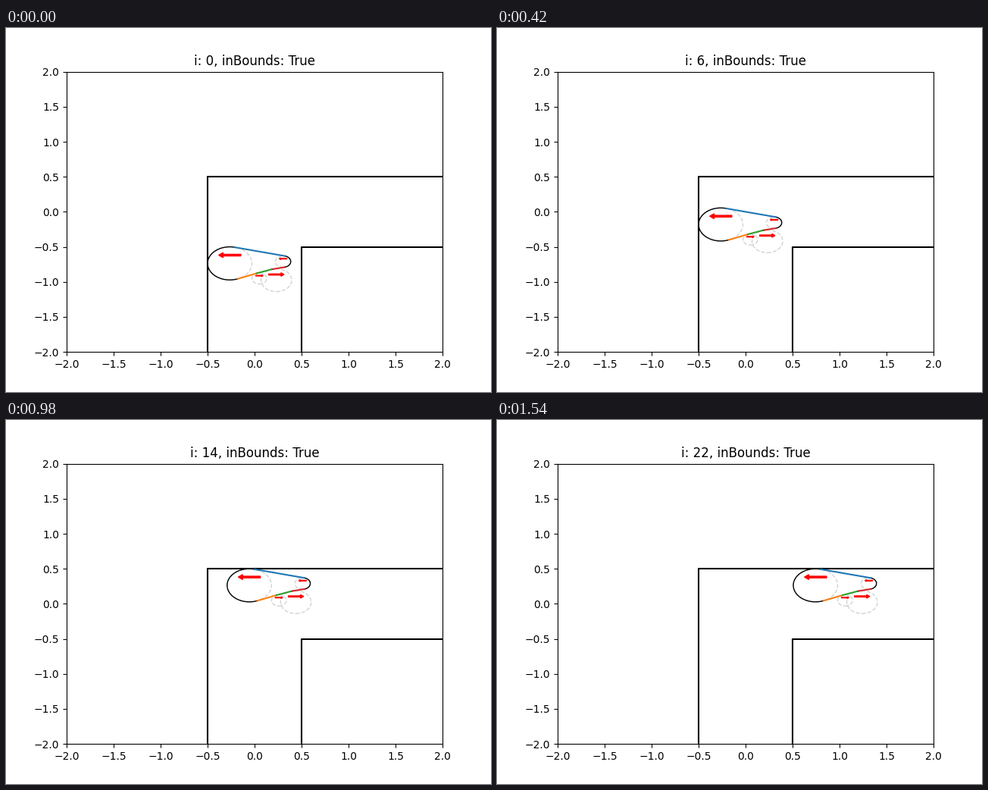
Write a matplotlib script that moves like this. It is 640 by 480 pixels and loops after 1.61 s.

```python
import numpy as np
import matplotlib.pyplot as plt
from matplotlib.animation import FuncAnimation
from matplotlib.patches import Circle
from matplotlib.transforms import Affine2D

FRAMES, INTERVAL = 23, 70

# (x, y, radius, turn): turn +1 bulges outward, -1 inward
BIG = (-0.264, -0.736, 0.236, 1)
TIP = (0.303, -0.710, 0.082, 1)
NOTCH = (0.051, -0.951, 0.079, -1)
HOLLOW = (0.232, -0.976, 0.163, -1)

fig, ax = plt.subplots(figsize=(6.4, 4.8), dpi=100)
shift = Affine2D()
moving = shift + ax.transData


def point(circle, angle):
    x, y, r, _ = circle
    return x + r * np.cos(angle), y + r * np.sin(angle)


def tangent(a, b, side):
    """Angles of the touching points of the line tangent to circles a and b."""
    dx, dy = b[0] - a[0], b[1] - a[1]
    cross = a[3] != b[3]
    reach = a[2] + b[2] if cross else a[2] - b[2]
    angle = np.arctan2(dy, dx) + side * np.arccos(reach / np.hypot(dx, dy))
    return angle, angle + np.pi * cross


def draw_tangent(a, b, angles, color):
    (x0, y0), (x1, y1) = point(a, angles[0]), point(b, angles[1])
    ax.plot([x0, x1], [y0, y1], color=color, transform=moving)


def draw_arc(circle, start, end):
    sweep = (end - start) % (2 * np.pi)
    xs, ys = point(circle, start + np.linspace(0, sweep, 80))
    ax.plot(xs, ys, color="black", lw=1, zorder=1.5, transform=moving)


def draw_guide(circle):
    x, y, r, turn = circle
    ax.add_patch(Circle((x, y), r, fill=False, ls="--", ec="lightgray",
                        transform=moving))
    ax.arrow(x + turn * r / 2, y + r / 2, -turn * r, 0, width=0.1 * r,
             head_width=0.3 * r, head_length=0.2 * r,
             length_includes_head=True, color="red", transform=moving)


# corridor walls
ax.plot([-0.5, -0.5, 2], [-2, 0.5, 0.5], color="black")
ax.plot([0.5, 0.5, 2], [-2, -0.5, -0.5], color="black")

for circle in (BIG, TIP, HOLLOW, NOTCH):
    draw_guide(circle)

top = tangent(BIG, TIP, 1)
low = tangent(BIG, NOTCH, -1)
mid = tangent(NOTCH, HOLLOW, 1)
end = tangent(TIP, HOLLOW, 1)
draw_tangent(BIG, TIP, top, "C0")
draw_tangent(BIG, NOTCH, low, "C1")
draw_tangent(NOTCH, HOLLOW, mid, "C2")
draw_tangent(TIP, HOLLOW, end, "C3")

draw_arc(BIG, top[0], low[0])
draw_arc(TIP, end[0], top[1])
draw_arc(HOLLOW, end[1], mid[1])

ax.set_xlim(-2, 2)
ax.set_ylim(-2, 2)
title = ax.set_title("")


def update(i):
    # up the corridor, a short pause at the corner, then right
    up = np.clip(i - 1, 0, 9) / 9
    right = 0.1 * np.clip(i - 12, 0, 10) + 0.004 * np.clip(i - 10, 0, 2)
    shift.clear().translate(right, up)
    title.set_text(f"i: {i}, inBounds: True")
    return ()


anim = FuncAnimation(fig, update, frames=FRAMES, interval=INTERVAL,
                     repeat=True, repeat_delay=0)
plt.show()
```
